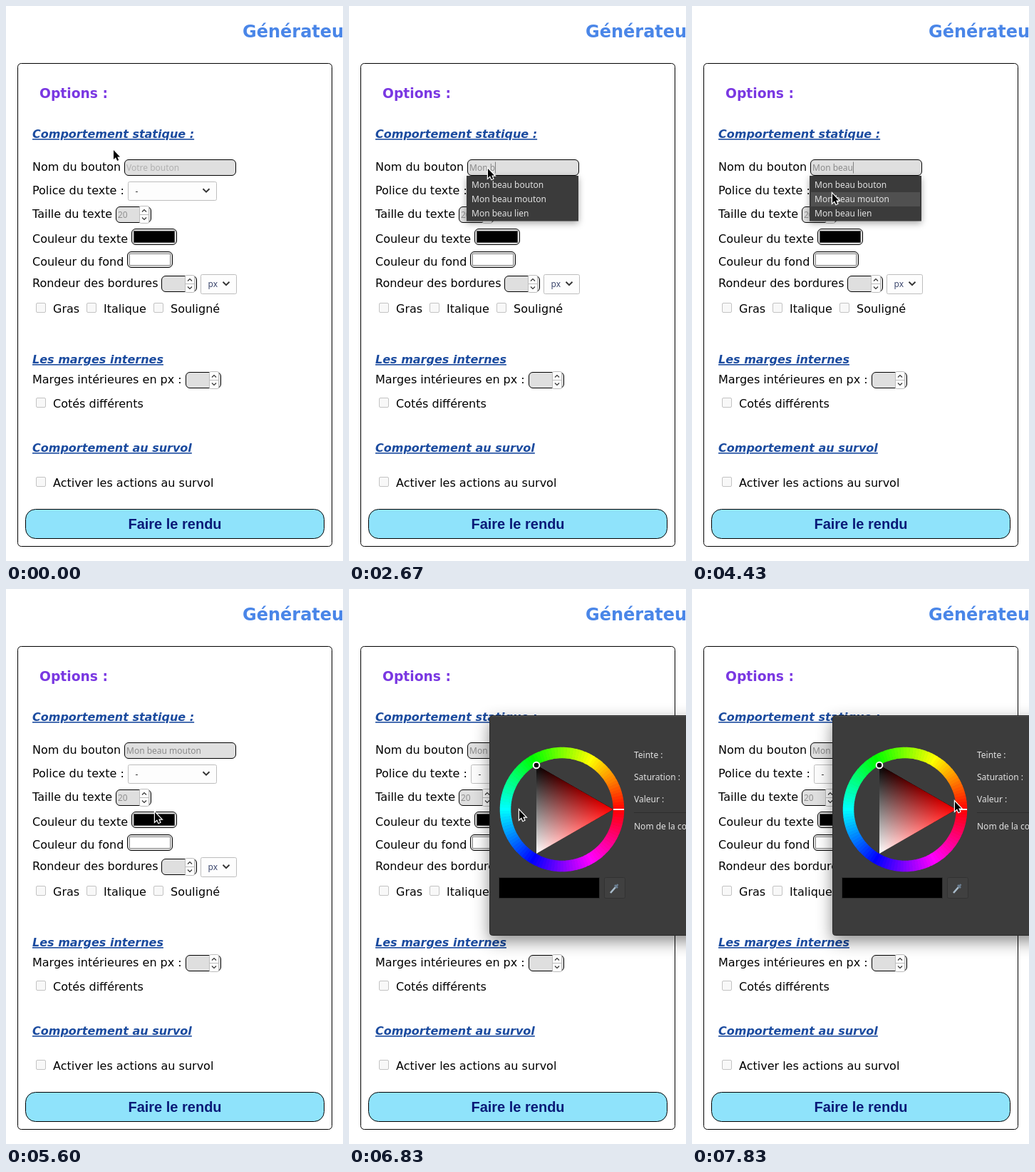
An HTML page for the animation above (8 s loop, 473x778 px).

```html
<!DOCTYPE html>
<html lang="fr">
<head>
<meta charset="utf-8">
<title>Options du bouton</title>
<style>
  html, body { margin: 0; width: 100%; height: 100%; overflow: hidden; background: #fff; }
  svg { display: block; width: 473px; height: 778px; }
  text { font: 16px "DejaVu Sans", sans-serif; white-space: pre; }
  .ui { font: 12px "Noto Sans", "Open Sans", sans-serif; }
  .section { font-weight: bold; font-style: oblique; text-decoration: underline; fill: #1b4b9f; }
  .field { fill: #dfdfdf; stroke: #000; }
  .widget { fill: #fdfdfd; stroke: #bdbdbd; }
  .chevron { fill: none; stroke: #333; }
  .light { fill: #e2e2e2; }
  .sum { mix-blend-mode: plus-lighter; }
  .list { filter: drop-shadow(0 3px 5px rgba(0,0,0,.35)); }
  .window { filter: drop-shadow(0 8px 11px rgba(0,0,0,.45)); }
</style>
</head>
<body>
<svg id="stage" viewBox="0 0 473 778"></svg>
<script>
const text = (x, y, s, attrs = '') => `<text x="${x}" y="${y}" ${attrs}>${s}</text>`;
const rect = (x, y, w, h, r, attrs) =>
  `<rect x="${x}" y="${y}" width="${w}" height="${h}" rx="${r}" ${attrs}/>`;
const chevron = (x, y, size, width) =>
  `<path class="chevron" stroke-width="${width}" d="M${x - size} ${y - size / 2}l${size} ${size}l${size} ${-size}"/>`;
const section = (y, s) => text(37, y, s, 'class="section"');
const field = (x, y, w) => rect(x + .5, y + .5, w, 22, 5.5, 'class="field"');
const checkbox = (x, y) => rect(x + .5, y + .5, 13, 13, 1.5, 'fill="#f8f8f8" stroke="#c3c3c3"');

function numberField(x, y) {
  const sx = x + 33.5;
  return field(x, y, 49) +
    rect(sx, y - .5, 13, 24, 2, 'class="widget"') +
    `<path d="M${sx} ${y + 11.5}h13" stroke="#bdbdbd"/>` +
    chevron(sx + 6.5, y + 6, -3, 1.2) + chevron(sx + 6.5, y + 17, 3, 1.2);
}

function select(x, y, w, h, label, fill) {
  return rect(x + .5, y + .5, w, h, 2, 'class="widget"') +
    text(x + 10.5, y + 17.5, label, `class="ui" fill="${fill}"`) +
    chevron(x + w - 14, y + h / 2 - .5, 4.5, 1.9);
}

const colorField = (x, y, color, edge) => field(x, y, 63) +
  rect(x + 3.5, y + 3.5, 57, 16, 0, `fill="${color}" stroke="${edge}"`);

function hueRing(cx, cy, radius, width) {
  const step = 3, point = deg => {
    const a = deg * Math.PI / 180;
    return `${cx + radius * Math.cos(a)} ${cy - radius * Math.sin(a)}`;
  };
  let out = '';
  for (let h = 0; h < 360; h += step)
    out += `<path d="M${point(h - 1.7)}A${radius} ${radius} 0 0 0 ${point(h + 1.7)}" fill="none" stroke="hsl(${h},100%,50%)" stroke-width="${width}"/>`;
  return out;
}

const form =
  text(332, 44, 'Générateu', 'style="font-size:24px;font-weight:bold" fill="#4a86e8"') +
  rect(16.5, 80.5, 441, 677, 5, 'fill="#fff" stroke="#000"') +
  text(47, 129, 'Options :', 'style="font-size:18.72px;font-weight:bold" fill="#7a38e2"') +
  section(185, 'Comportement statique :') +
  text(37, 231, 'Nom du bouton') + field(166, 215, 156) +
  text(37, 264, 'Police du texte :') + select(171, 246, 124, 26, '-', '#333') +
  text(37, 297, 'Taille du texte') + numberField(154, 281) +
  text(157, 297, '20', 'class="ui" fill="#909090"') +
  text(37, 332, 'Couleur du texte') + colorField(176, 312, '#000', '#555') +
  text(37, 364, 'Couleur du fond') + colorField(170, 344, '#fff', '#8c8c8c') +
  text(37, 394, 'Rondeur des bordures') + numberField(218, 378) +
  select(273, 376, 50, 27, 'px', '#3f4a70') +
  [[42, 'Gras'], [113, 'Italique'], [207, 'Souligné']]
    .map(([x, s]) => checkbox(x, 416) + text(x + 24, 430, s)).join('') +
  section(501, 'Les marges internes') +
  text(37, 529, 'Marges intérieures en px :') + numberField(252, 513) +
  checkbox(42, 549) + text(66, 563, 'Cotés différents') +
  section(625, 'Comportement au survol') +
  checkbox(42, 660) + text(66, 674, 'Activer les actions au survol') +
  rect(27.5, 705.5, 419, 41, 14, 'fill="#8fe3fb" stroke="#000"') +
  text(237, 733, 'Faire le rendu', 'text-anchor="middle" fill="#0a1a78" style="font:bold 20px \'Liberation Sans\',Arial,sans-serif"');

const suggestions = ['Mon beau bouton', 'Mon beau mouton', 'Mon beau lien', 'Mon lien', 'Mon texte', 'Ma page'];

const popup = `<g id="popup">
  <rect id="list" class="list" x="165" y="238" width="157" fill="#3b3b3b"/>
  <rect id="hover" x="167" width="153" height="20" fill="#505050"/>` +
  suggestions.map((s, i) => text(172, 255 + 20 * i, s, 'class="ui light item"')).join('') + '</g>';

const triangle = 'd="M371 309L263 247V371Z"';
const dialog = `<g id="dialog">
  <defs>
    <linearGradient id="red" gradientUnits="userSpaceOnUse" x1="263" y1="0" x2="371" y2="0">
      <stop stop-color="#000"/><stop offset="1" stop-color="#f00"/></linearGradient>
    <linearGradient id="white" gradientUnits="userSpaceOnUse" x1="317" y1="278" x2="263" y2="371">
      <stop stop-color="#000"/><stop offset="1" stop-color="#fff"/></linearGradient>
  </defs>` +
  rect(197.5, 177.5, 320, 308, 4, 'class="window" fill="#3c3c3c" stroke="#2b2b2b"') +
  '<path d="M201 178.5H473" stroke="#505050"/>' +
  hueRing(299, 309, 79.5, 15.5) +
  `<path d="M371 309h15" stroke="#fff" stroke-width="2"/>
  <g style="isolation:isolate"><path ${triangle} fill="url(#red)"/><path class="sum" ${triangle} fill="url(#white)"/></g>
  <circle cx="263" cy="247" r="4.3" fill="#000" stroke="#fff" stroke-width="2"/>` +
  rect(210.5, 404.5, 141, 29, 0, 'fill="#000" stroke="#303030"') +
  rect(358.5, 404.5, 29, 29, 2, 'fill="#404040" stroke="#323232"') +
  `<path d="M367 426l7-8" stroke="#a9bccb" stroke-width="2.5"/>
  <path d="M373 415l4 4M374.500 417.500l3-3.500" stroke="#6b7f92" stroke-width="2.500"/>
  <path d="M400 313.500H473" stroke="#2e2e2e"/>` +
  [[237, 'Teinte :'], [268, 'Saturation :'], [299, 'Valeur :'], [337, 'Nom de la couleur :']]
    .map(([y, s]) => text(400, y, s, 'class="ui light"')).join('') + '</g>';

const pointers = `<g id="pointer">
  <path id="arrow" d="M0 0V13L3 10.300L5.200 15L7.200 14L5.200 9.500H9Z" fill="#000" stroke="#fff" stroke-width="2.400" paint-order="stroke"/>
  <g id="beam" fill="none"><path d="M-3.500 -6.500h3l.5 1l.5 -1h3M0 -6V6M-3.500 6.500h3l.5 -1l.5 1h3" stroke="#fff" stroke-width="3.200"/>
  <path d="M-3.500 -6.500h3l.5 1l.5 -1h3M0 -6V6M-3.500 6.500h3l.5 -1l.5 1h3" stroke="#000" stroke-width="1.300"/></g></g>`;

document.getElementById('stage').innerHTML = form +
  text(169, 231, '', 'id="value" class="ui"') +
  '<path id="caret" d="M.5 218.500V234.500" stroke="#808080"/>' + popup + dialog + pointers;

const $ = id => document.getElementById(id);
const show = (el, on) => el.setAttribute('visibility', on ? 'visible' : 'hidden');
const items = [...document.querySelectorAll('.item')];

const typing = [
  [1770, 'M'], [2030, 'Mo'], [2200, 'Mon'], [2430, 'Mon '], [2670, 'Mon b'],
  [2800, 'Mon be'], [2930, 'Mon bea'], [3100, 'Mon beau'], [4630, 'Mon beau mouton']
];
// time, x, y
const path = [
  [330, 151, 202], [480, 178, 211], [560, 201, 224], [630, 195, 228],
  [3900, 195, 228], [4150, 196, 244], [4430, 197, 263],
  [5070, 197, 263], [5350, 204, 292], [5600, 209, 313],
  [5800, 209, 313], [6130, 207, 318], [6680, 207, 318],
  [6830, 239, 310], [6960, 285, 277], [7100, 335, 288], [7230, 358, 315],
  [7400, 336, 363], [7530, 318, 351], [7600, 322, 346],
  [7700, 352, 311], [7770, 373, 286], [7830, 369, 298]
];

function pointerAt(t) {
  const next = path.findIndex(p => p[0] > t);
  if (next < 0) return path[path.length - 1].slice(1);
  if (next === 0) return path[0].slice(1);
  const a = path[next - 1], b = path[next], k = (t - a[0]) / (b[0] - a[0]);
  return [1, 2].map(i => Math.round(a[i] + (b[i] - a[i]) * k));
}

function render(t) {
  const typed = typing.filter(s => s[0] <= t).pop();
  const value = $('value');
  value.textContent = typed ? typed[1] : 'Votre bouton';
  value.setAttribute('fill', typed ? '#8a8a8a' : '#b0b0b0');
  const end = typed ? Math.round(value.getComputedTextLength()) : 0;
  $('caret').setAttribute('transform', `translate(${169 + end})`);
  show($('caret'), t >= 830 && t < 5300);

  const [x, y] = pointerAt(t);
  const open = t >= 1870 && t < 4630;
  $('popup').style.display = open ? '' : 'none';
  if (open) {
    const matches = suggestions.filter(s => s.startsWith(typed[1])).length;
    $('list').setAttribute('height', 3.5 + 20 * matches);
    items.forEach((item, i) => show(item, i < matches));
    const row = Math.floor((y - 241) / 20);
    show($('hover'), row >= 0);
    $('hover').setAttribute('y', 241 + 20 * Math.max(row, 0));
  }

  const fade = Math.min(1, Math.max(0, (t - 6200) / 270));
  $('dialog').style.display = fade ? '' : 'none';
  $('dialog').setAttribute('opacity', fade);

  const inField = x > 166 && y > 215 && y < 238 && t < 1870;
  $('pointer').setAttribute('transform', `translate(${x} ${y})`);
  show($('beam'), inField);
  show($('arrow'), !inField);
}

const start = performance.now();
function tick() {
  render((performance.now() - start) % 8000);
  requestAnimationFrame(tick);
}
tick();
</script>
</body>
</html>
```
